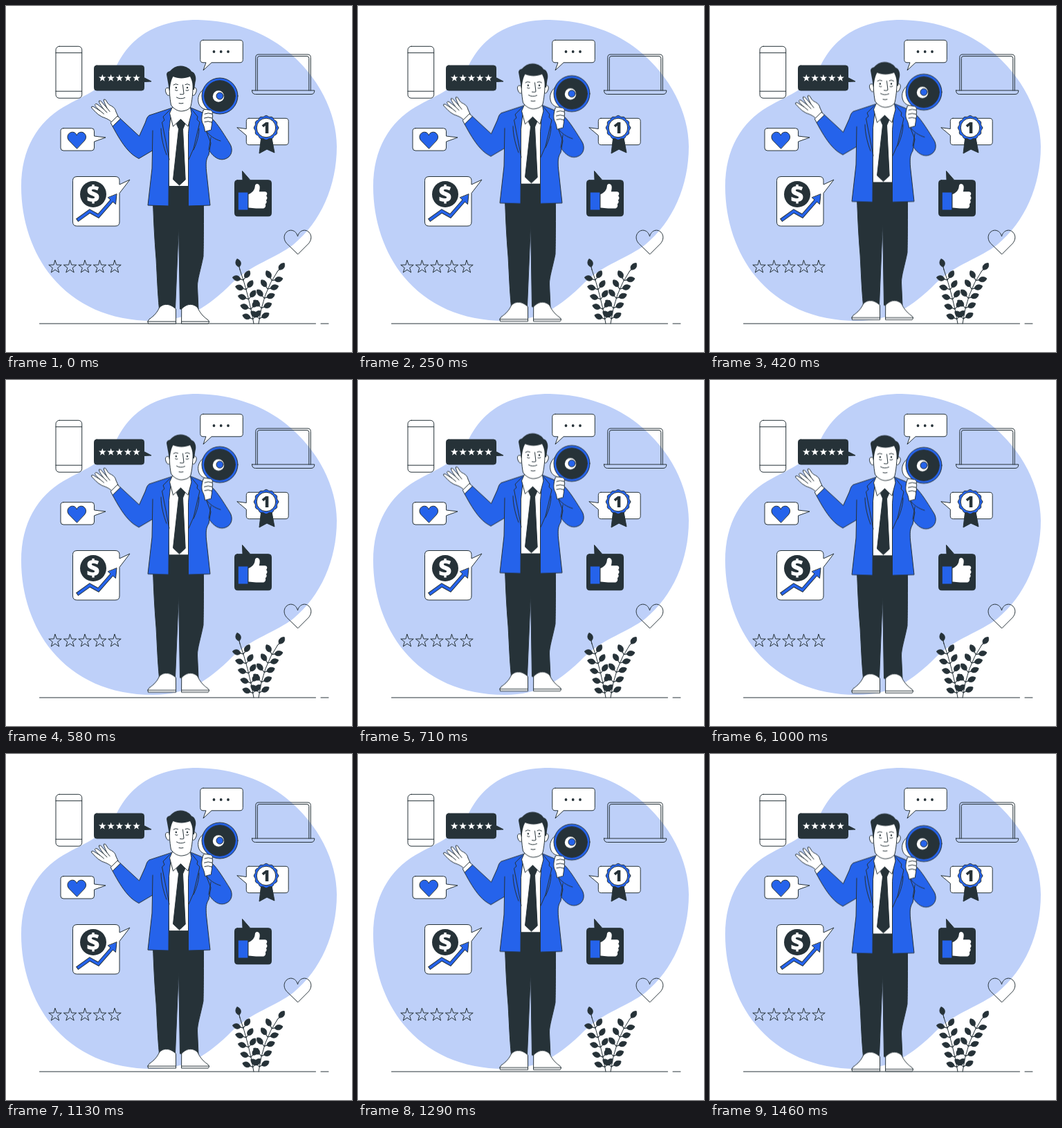
These frames come from a looping animation (500 px wide and 500 px high, 1.5 s). An HTML page:

```html
<!DOCTYPE html>
<html lang="en">
<head>
<meta charset="utf-8">
<title>Marketing</title>
<style>
  html, body { margin: 0; width: 100%; height: 100%; overflow: hidden; background: #fff; }
  svg { display: block; width: 100vw; height: 100vh; }
  .ink { stroke: #263238; stroke-width: 1; stroke-linejoin: round; stroke-linecap: round; }
  .white { fill: #fff; }
  .dark { fill: #263238; }
  .blue { fill: #2563eb; }
  .none { fill: none; }
  text { font-family: "Open Sans", sans-serif; font-weight: 800; font-stretch: 75%; text-anchor: middle; }
</style>
</head>
<body>
<svg viewBox="0 0 500 500">
  <path fill="#bed0f9" d="M160 86C172 62 200 20 277 20C330 21 374 39 404 63C452 101 478 155 478 203C478 260 455 312 415 345C392 363 352 375 327 400C292 435 262 455 212 455C150 455 100 432 66 391C38 357 22 310 22 261C22 206 46 168 83 146C118 126 143 120 160 86Z"/>

  <!-- phone -->
  <g class="ink white">
    <rect x="72" y="58.3" width="37.7" height="74.9" rx="5"/>
    <path d="M72 67.7H109.7M72 123.2H109.7"/>
  </g>

  <!-- laptop -->
  <g class="ink none">
    <path d="M360.8 122V74.5Q360.8 70 365 70H436Q440.3 70 440.3 74.5V122"/>
    <path d="M363.3 122V75.5Q363.3 72.6 366 72.6H435Q437.8 72.6 437.8 75.5V122"/>
    <path d="M355.5 122H445.8Q445.8 127.5 441 127.5H360.5Q355.5 127.5 355.5 122Z"/>
  </g>

  <!-- rating bubble -->
  <path class="ink dark" d="M131 86H196Q199.5 86 199.5 89.5V103.5L210 109L199.5 109.5V118.5Q199.5 122 196 122H131Q127.5 122 127.5 118.5V89.5Q127.5 86 131 86Z"/>
  <g id="rating" class="white"></g>

  <!-- chat bubble -->
  <path class="ink white" d="M285 49.3H338Q342.3 49.3 342.3 53.5V77.5Q342.3 81.8 338 81.8H297L285 93L289 81.8H285Q280.8 81.8 280.8 77.5V53.5Q280.8 49.3 285 49.3Z"/>
  <g class="dark"><circle cx="300.5" cy="66" r="1.9"/><circle cx="310.7" cy="66" r="1.9"/><circle cx="321" cy="66" r="1.9"/></g>

  <!-- heart bubble -->
  <path class="ink white" d="M83 176.7H123.5Q127.5 176.7 127.5 180.7V188L144 190L127.5 196V205Q127.5 209 123.5 209H83Q79 209 79 205V180.7Q79 176.7 83 176.7Z"/>
  <path class="ink blue" d="M102.3 206L91 194.5C85.5 188 92 180.5 98 182.5C100.5 183.3 101.5 185 102.3 187C103 185 104.2 183.3 106.7 182.5C112.7 180.5 119 188 113.6 194.5Z"/>

  <!-- award bubble -->
  <path class="ink white" d="M351 162.3H404Q408.2 162.3 408.2 166.5V196.5Q408.2 200.7 404 200.7H351.5Q347.3 200.7 347.3 196.5V187L333.8 175.7L347.3 177.5V166.5Q347.3 162.3 351 162.3Z"/>
  <path class="ink dark" d="M369 188L366 213L377 207L388 212L383.5 188Z"/>
  <path id="badge" class="ink blue"/>
  <circle class="ink white" cx="376" cy="176" r="13.8"/>
  <text class="dark" x="375.5" y="184.3" font-size="23">1</text>

  <!-- growth card -->
  <path class="ink white" d="M102.5 246.5H158Q164 246.5 164 252.5V258L179 251L164 270.5V312Q164 318 158 318H102.5Q96.500 318 96.500 312V252.500Q96.500 246.500 102.500 246.500Z"/>
  <circle class="dark" cx="126" cy="272" r="19"/>
  <text class="white" x="126" y="284" font-size="33">$</text>
  <g fill="none">
    <path stroke="#263238" stroke-width="5.6" d="M102.600 309.800L121 296.500L133.500 303.500L154 280"/>
    <path class="ink blue" d="M160 272L158.500 286.500L147.500 277Z"/>
    <path stroke="#2563eb" stroke-width="3.700" d="M103.500 309.200L121 296.500L133.500 303.500L154 280"/>
  </g>

  <!-- like bubble -->
  <path class="ink dark" d="M334 251.700H342L341.500 238.500L353 251.700H379.500Q383.500 251.700 383.500 255.700V299.700Q383.500 303.700 379.500 303.700H334.500Q330.500 303.700 330.500 299.700V255.700Q330.500 251.700 334 251.700Z"/>
  <rect class="blue" x="335.800" y="269.500" width="13.500" height="25"/>
  <path class="white" d="M350.500 272C356 270 359.500 265.500 359.800 260.500Q360 257 363 257C367.500 257.500 367.300 263 365.800 268.300H374C378 268.500 378 272.500 376 274.300C378 276.300 378 279 375.800 280.500C377.300 282.500 376.800 285 374.800 286.200C376 289 374.500 292.500 371 292.500H361.500C357 292.500 355 291.500 350.500 291.500Z"/>

  <path class="ink none" d="M421.500 358.500L405.500 343C397.500 333.500 405 323 413 324.200C418 325 420.500 329 421.500 333C422.500 329 425 325 430 324.200C438 323 445.500 333.500 437.500 343Z"/>
  <g id="stars" class="ink none"></g>
  <path class="ink none" d="M48.500 459H447.500M455 459H466"/>
  <g id="plants" class="ink dark"></g>

  <g id="man">
    <!-- trousers and shoes -->
    <path class="ink dark" d="M212.500 284L235 258H265L285.500 284C285.500 320 285.500 345 285 362C281 382 276.500 395 276.500 405L278 438H251.500L249.500 318L244.500 438H221.500C219 412 218.500 392 217 365C214.500 335 213.500 310 212.500 284Z"/>
    <g class="ink white">
      <path d="M245.200 459H205.500Q203.500 456 207 452.500C214 448 219 442 221.500 436C227 430 236 429 245.200 437.500Z"/>
      <path d="M204.600 456H245.200"/>
      <path d="M254 459H292Q295.500 456 291 453C284 448 279.500 442 277 436C271 430 262 429 254 437.500Z"/>
      <path d="M254 456H293.500"/>
    </g>

    <!-- shirt and tie -->
    <path class="ink white" d="M237 150L268 148L272 175L264.500 260.500H235.500L234 180Z"/>
    <path class="ink dark" d="M246.500 170L252.500 163.500L259 170L255.500 178L259.200 251L250.500 259L241.500 250.500L249.500 178Z"/>

    <!-- open hand -->
    <path class="ink white" d="M152.500 167.500C147 162.500 143 162 138.500 160C132 157 127 150.500 123.500 147Q122.800 144.500 126.500 145.500L136 151.500C132 148 128.500 144.500 128.500 142.500Q129 140.500 132 142L141 149C137 143.500 134 139.500 134.500 137Q136.500 136 138.500 139L146 147.500C143.500 142 140.500 137 141.500 135Q143.500 133.800 145.500 138C147.500 141.500 149 143 152.500 144.500C156.500 146.500 158.500 150 159 153L162.500 160.500Z"/>
    <path class="ink none" d="M136 151.500L141.500 156M141 149L146 154M146 147.500L150 152.500"/>
    <path class="ink white" d="M151.500 168.500L161 159L165.500 163L154.500 174Z"/>

    <!-- jacket -->
    <g class="ink blue">
      <path d="M268 148.500L290 157C300 162 308 174 323.500 199C328.500 207 326.500 217 318 220.500C309 224.500 300 219 293 208Z"/>
      <path d="M239 147.500L207 158C204 160 203 163 201.500 168L192.500 188L165.500 163L154 174C161 187 168 199 176 208C181 214 187 218 192 220.500L211.500 209L211 235L205 288L235 289L235.500 182Z"/>
      <path d="M267 147L284 154L289 180L296 198L293 215C288.500 222 289 228 289.500 238L295 288L263.500 289L263.500 185Z"/>
    </g>
    <g class="ink none">
      <path d="M211.500 209L212 180M289 180C294 188 303 193 310 195M293 208L296 190"/>
      <path d="M237 150L227 160L229 165L225.500 168L236 222M268 149L277 160L276 164L280 168L271 206L264 222"/>
      <path d="M224 177C224 190 228 205 232 215M279 177C279 190 273 204 271 208"/>
    </g>
    <path class="ink white" d="M240 147L236.500 155L241.500 174L252.500 163.500L263 174L268 155L266.500 147Z"/>

    <!-- head -->
    <path class="ink white" d="M236 119C231 116 229 121 231.500 126Q233 130.500 237 129ZM269 119C274.500 115 277 121 274 126Q272.500 130.500 268.500 129Z"/>
    <path class="ink white" d="M236 97C235.500 118 236.500 133 238.500 143C242 148.500 248 152 253.500 152C260 151.500 265 149.500 267 145C269.500 134 271 118 270 97Z"/>
    <path class="dark" d="M235.800 122C235 114 233.500 108 232 99Q232 95 237 94C241 89 247 86 253 86.500C261 87 266 91 268 94.500C274 96 275.500 105 273.500 110L272 121H270C270.500 113 268.500 107 266 102C258 105.500 248 105 241.500 102C238.500 107 237 115 236.800 122Z"/>
    <g class="ink none">
      <path d="M242 114Q245 111.500 248.500 113.500M259 113.500Q262 111.500 265.500 114M255.500 114L257 127Q255.500 128.500 251.500 127.500M246.500 132Q252 135.500 258.500 132.500M250 140.500Q253 141.500 256 140.500"/>
      <path d="M244.500 121.500Q246 123 248 122M260 122Q262 123 264 121.500"/>
    </g>
    <g class="dark"><circle cx="245.800" cy="118" r="1.250"/><circle cx="262" cy="118" r="1.250"/></g>

    <!-- megaphone -->
    <path class="ink white" d="M294 115C281 121 276 130 278 139C279.500 147 287 151 296 150Z"/>
    <circle class="ink blue" cx="309" cy="130" r="26"/>
    <circle class="ink dark" cx="309" cy="130" r="22.300"/>
    <circle class="white" cx="307" cy="130.500" r="8.200"/>
    <circle class="ink blue" cx="309" cy="130" r="5"/>

    <!-- gripping hand -->
    <path class="ink white" d="M285 151Q286 148.500 289 149.500L295.500 150.500Q299.500 152 298 156Q299.500 159 298 162Q299.500 165 297.500 168C298 172 296.500 174 296.500 179L287.500 181.500C287 175 285 171 283.500 168C282 162 283.500 156 285 151Z"/>
    <path class="ink none" d="M298 156Q292 153.500 287 156M298 162Q292 159.500 286.500 162M297.500 168Q292 165.500 287 167.500"/>
  </g>
</svg>
<script>
  const $ = id => document.getElementById(id);

  const star = (cx, cy, r) => {
    const pts = Array.from({ length: 10 }, (_, i) => {
      const a = (i / 5 - 0.5) * Math.PI, d = i % 2 ? r * 0.4 : r;
      return (cx + d * Math.cos(a)).toFixed(2) + ',' + (cy + d * Math.sin(a)).toFixed(2);
    });
    return `<polygon points="${pts.join(' ')}"/>`;
  };
  const starRow = (x, y, r, gap) =>
    [0, 1, 2, 3, 4].map(i => star(x + i * gap, y, r)).join('');

  $('rating').innerHTML = starRow(139.3, 104.3, 5.6, 12.3);
  $('stars').innerHTML = starRow(71, 377.2, 9.7, 21.5);

  // scalloped edge
  let edge = '';
  for (let i = 0; i <= 120; i++) {
    const a = i / 60 * Math.PI, r = 17 + Math.cos(a * 12) * 0.7;
    edge += (i ? 'L' : 'M') + (376 + r * Math.cos(a)).toFixed(2) + ' ' + (176 + r * Math.sin(a)).toFixed(2);
  }
  $('badge').setAttribute('d', edge + 'Z');

  const leaf = (x, y, deg) =>
    `<path transform="translate(${x} ${y}) rotate(${deg})" stroke-width=".8" d="M0 0L4 0C6 -5 12 -5.500 16 -1C13 4.500 7 4.500 4 0Z"/>`;

  // quadratic stem with paired leaves
  function plant([x0, y0], [x1, y1], [x2, y2]) {
    let out = `<path fill="none" d="M${x0} ${y0}Q${x1} ${y1} ${x2} ${y2}"/>`;
    const mix = (a, b, c, t) => (1 - t) ** 2 * a + 2 * t * (1 - t) * b + t * t * c;
    const slope = (a, b, c, t) => (1 - t) * (b - a) + t * (c - b);
    for (let i = 0; i < 5; i++) {
      const t = 0.08 + i * 0.18;
      const x = mix(x0, x1, x2, t), y = mix(y0, y1, y2, t);
      const deg = Math.atan2(slope(y0, y1, y2, t), slope(x0, x1, x2, t)) * 180 / Math.PI;
      out += leaf(x, y, deg - 55) + leaf(x, y, deg + 55);
    }
    const tip = Math.atan2(y2 - y1, x2 - x1) * 180 / Math.PI;
    return out + leaf(x2, y2, tip + 8);
  }
  $('plants').innerHTML =
    plant([358, 459], [351, 418], [338, 381]) +
    plant([365, 459], [371, 414], [392, 384]);

  $('man').animate(
    [{ transform: 'translateY(0px)' }, { transform: 'translateY(-10px)' }, { transform: 'translateY(0px)' }],
    { duration: 1500, iterations: Infinity, easing: 'linear' }
  );
</script>
</body>
</html>
```
